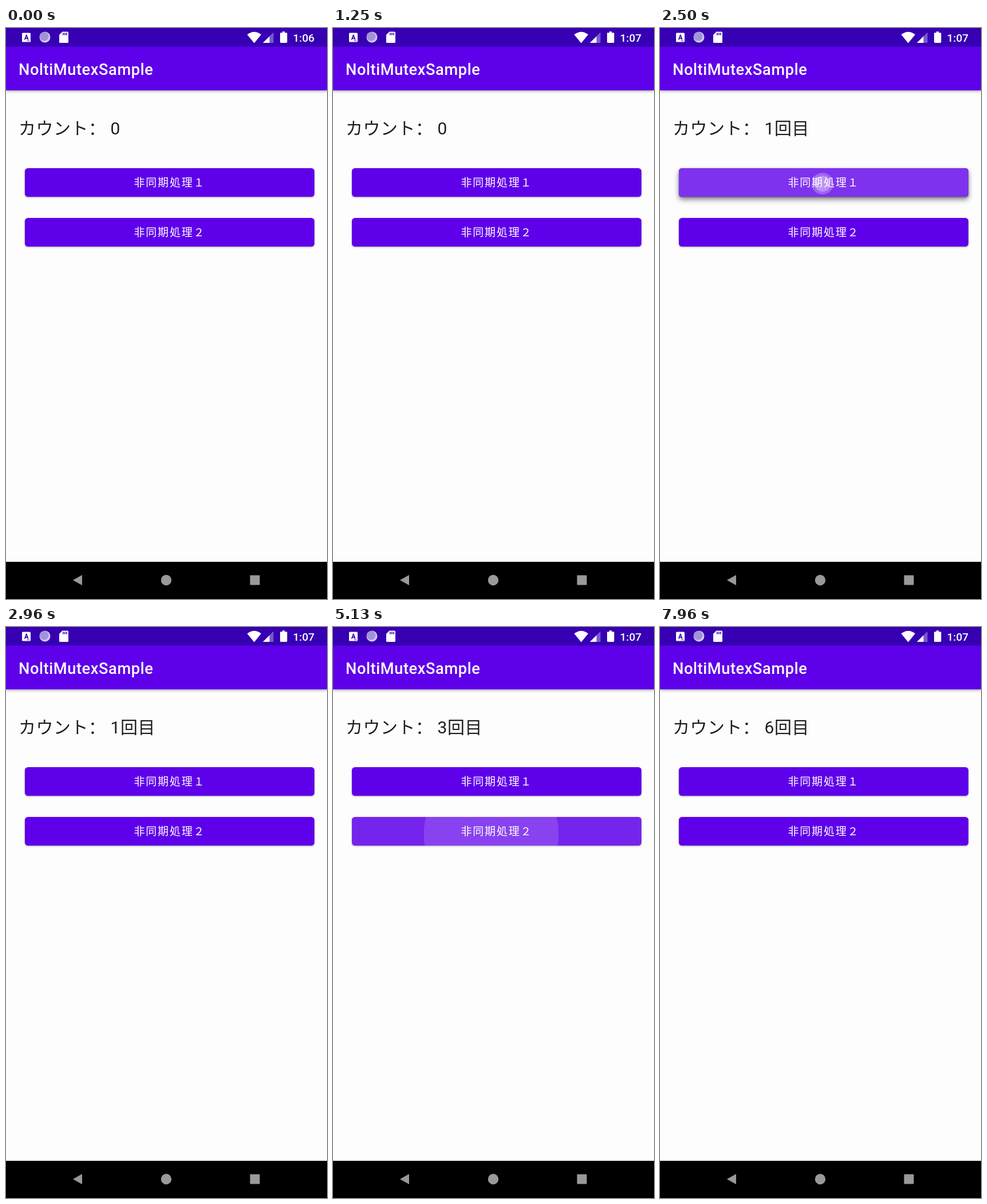
These frames come from a looping animation (561x998 px, 8000 ms). An HTML page:

```html
<!DOCTYPE html>
<html lang="zh-Hans">
<head>
<meta charset="utf-8">
<title>NoltiMutexSample</title>
<style>
  html, body { margin: 0; width: 100%; height: 100%; overflow: hidden; background: #fdfdfd; }
  .stage { display: block; width: 100vw; height: 100vh; }
  text { font-family: Roboto, "Noto Sans CJK SC", "Noto Sans CJK JP", sans-serif; white-space: pre; }
  .white { fill: #fff; }
  .medium { font-weight: 500; }
  .title { font-size: 27.3px; letter-spacing: .55px; }
  .time { font-size: 19.1px; }
  .count { font-size: 30px; letter-spacing: .53px; fill: #1e1e20; }
  .label { font-size: 19.1px; letter-spacing: 1.71px; fill: #fff; }

  .bar { fill: #5f00ea; filter: drop-shadow(0 2px 2px rgba(0, 0, 0, .3)); }
  .button { fill: #5f00ea; filter: drop-shadow(0 1.5px 1.5px rgba(0, 0, 0, .35)); }
  .lifted { filter: drop-shadow(0 5px 5px rgba(0, 0, 0, .45)); }

  .clock { animation: clock 8s step-end infinite; }
  .digits { animation: digits 8s step-end infinite; }
  .press, .wave, .lifted, .dot { animation: 8s linear infinite; animation-delay: var(--at); }
  .press { animation-name: press; }
  .wave { animation-name: wave; }
  .lifted { animation-name: lift; }
  .dot { animation-name: dot; }
  /* negative delays place each tap in the loop */
  .first { --at: -5800ms; }
  .second { --at: -2940ms; }

  @keyframes clock { 11.25%, 100% { transform: translateY(-24px); } }
  @keyframes digits {
    0% { transform: none; }
    30.9% { transform: translateY(-50px); }
    43.4% { transform: translateY(-100px); }
    55.9% { transform: translateY(-150px); }
    68.4% { transform: translateY(-200px); }
    80.9% { transform: translateY(-250px); }
    93.4%, 100% { transform: translateY(-300px); }
  }
  @keyframes press {
    0% { opacity: 0; }
    .6%, 2.75% { opacity: 1; }
    7.2%, 100% { opacity: 0; }
  }
  @keyframes wave {
    0% { transform: scale(0); }
    .875% { transform: scale(.45); }
    2.9%, 100% { transform: scale(1); }
  }
  @keyframes lift {
    0% { opacity: 0; }
    1.25%, 3.9% { opacity: 1; }
    5.2%, 100% { opacity: 0; }
  }
  @keyframes dot {
    0% { opacity: 0; }
    .3%, 3.8% { opacity: 1; }
    5.5%, 100% { opacity: 0; }
  }
</style>
</head>
<body>
<svg class="stage" viewBox="0 0 561 998" preserveAspectRatio="none">
  <defs>
    <rect id="face" x="33" y="245" width="506" height="50" rx="5.5"/>
    <clipPath id="edge"><use href="#face"/></clipPath>
  </defs>

  <rect width="561" height="998" fill="#fdfdfd"/>
  <rect class="bar" y="32" width="561" height="77"/>
  <rect width="561" height="32.5" fill="#3700b3"/>

  <!-- status icons -->
  <rect x="28" y="8.5" width="15" height="16" rx="1.5" fill="#fff"/>
  <path d="M31.8 20.5 35 11.5h1.4l3.2 9h-2l-.6-1.8h-2.8l-.6 1.8zM34.8 17h1.7l-.8-2.6z" fill="#3700b3"/>
  <path d="M37 22.3h4" stroke="#3700b3" stroke-width="1.2" stroke-dasharray="1 .5"/>
  <circle cx="68" cy="16" r="9.5" fill="#d2c8ef"/>
  <circle cx="66.7" cy="14.8" r="7.8" fill="#a293d9"/>
  <path d="M98.5 6.5h9q1.5 0 1.5 1.5v16.5q0 1.5-1.5 1.5h-13q-1.5 0-1.5-1.5V12z" fill="#fff"/>
  <path d="M100 8.5v4M103 8.5v4M106 8.5v4" stroke="#3700b3" stroke-width="1.7"/>
  <path d="M421.5 11.5Q434 2 446 11.5L433.8 26.5z" fill="#fff"/>
  <path d="M467.5 7.5V26H449z" fill="#fff" opacity=".35"/>
  <path d="M460.5 14.5V26H449z" fill="#fff"/>
  <path d="M483 6h4v2.2h3q1.4 0 1.4 1.4v15q0 1.4-1.4 1.4h-9.600q-1.400 0-1.400-1.400v-15q0-1.400 1.400-1.400h2.600z" fill="#fff"/>
  <svg x="500" y="5" width="50" height="24">
    <g class="clock white time medium">
      <text x="1.500" y="18.800">1:06</text>
      <text x="1.500" y="42.800">1:07</text>
    </g>
  </svg>

  <text class="title medium white" x="22" y="81.500">NoltiMutexSample</text>

  <text class="count" x="22" y="185.500">カウント：</text>
  <svg x="180" y="150" width="120" height="50">
    <g class="digits count">
      <text x="2.600" y="35.500">0</text>
      <text x="2.600" y="85.500">1回目</text>
      <text x="2.600" y="135.500">2回目</text>
      <text x="2.600" y="185.500">3回目</text>
      <text x="2.600" y="235.500">4回目</text>
      <text x="2.600" y="285.500">5回目</text>
      <text x="2.600" y="335.500">6回目</text>
    </g>
  </svg>

  <g class="first">
    <g class="lifted"><use href="#face" fill="#5f00ea"/></g>
    <use class="button" href="#face"/>
    <g class="press" clip-path="url(#edge)" fill="#fff" fill-opacity=".14">
      <use href="#face"/>
      <g transform="translate(284 271)"><circle class="wave" r="260"/></g>
    </g>
    <text class="label" x="223.500" y="277">非同期処理１</text>
    <g class="dot" fill="#fff">
      <circle cx="284" cy="272" r="19" fill-opacity=".25"/>
      <circle cx="284" cy="272" r="14" fill-opacity=".3"/>
    </g>
  </g>

  <g class="second" transform="translate(0 87)">
    <use class="button" href="#face"/>
    <g class="press" clip-path="url(#edge)" fill="#fff" fill-opacity=".14">
      <use href="#face"/>
      <g transform="translate(276.500 275)"><circle class="wave" r="260"/></g>
    </g>
    <text class="label" x="223.500" y="277">非同期処理２</text>
  </g>

  <!-- navigation bar -->
  <rect y="933" width="561" height="65"/>
  <g fill="#999">
    <path d="M117 965 133 956v18z"/>
    <circle cx="280" cy="965" r="9.200"/>
    <rect x="426.500" y="956.500" width="17" height="17" rx="1"/>
  </g>
</svg>
</body>
</html>
```
